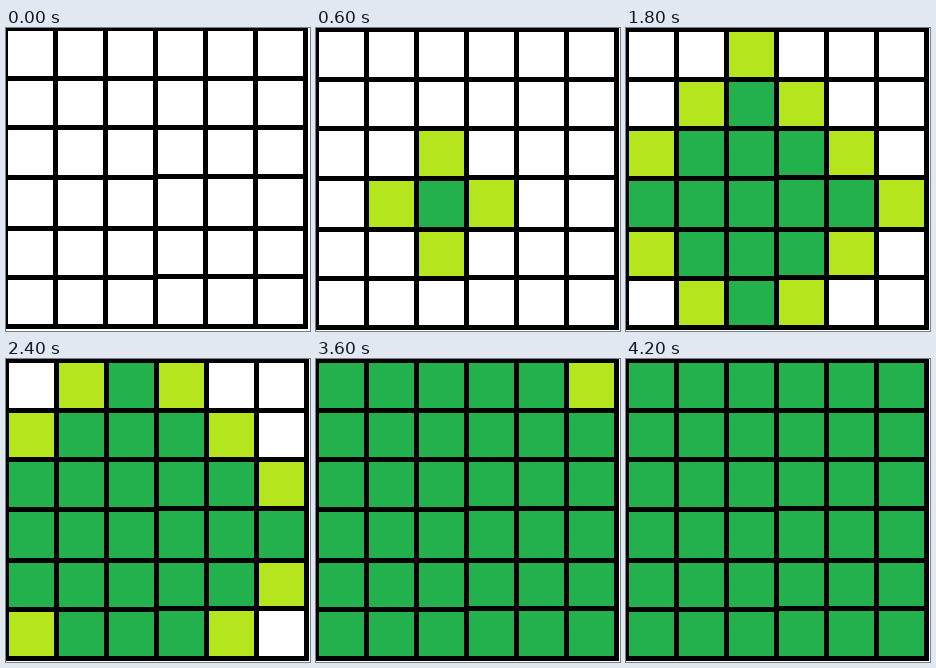
An HTML page for the animation above (4.8 s loop, 304 by 303 pixels).

```html
<!DOCTYPE html>
<html lang="en">
<head>
<meta charset="utf-8">
<title>Grid fill</title>
<style>
  html, body { margin: 0; width: 100%; height: 100%; overflow: hidden; background: #fff; }
  svg { display: block; }
  rect, g { animation: 4800ms step-end infinite; }
  #board { animation-name: nudge; }
  @keyframes nudge { 0% { transform: translate(-1px, -1px); } 12.5%, 100% { transform: none; } }
</style>
</head>
<body>
<svg width="304" height="303" viewBox="0 0 304 303" shape-rendering="crispEdges">
  <g id="board"><rect width="303" height="302"/></g>
</svg>
<script>
  const STEP = 12.5; // percent of the loop
  const START = { col: 2, row: 3 };
  const WHITE = '#fff', LIME = '#b5e61d', GREEN = '#22b14c';

  // Row spans differ slightly between the two halves of the board
  const LEFT = [[4, 49], [54, 98], [103, 148], [153, 199], [204, 248], [253, 297]];
  const RIGHT = [[4, 49], [54, 98], [103, 147], [152, 199], [204, 247], [252, 297]];

  // Each cell turns lime when the front reaches it, green one step later
  const spread = d => {
    const lime = d ? `${d * STEP}% { fill: ${LIME}; }` : '';
    return `@keyframes spread${d} { 0% { fill: ${WHITE}; } ${lime}
      ${(d + 1) * STEP}%, 100% { fill: ${GREEN}; } }`;
  };

  const style = document.createElement('style');
  style.textContent = Array.from({ length: 7 }, (_, d) => spread(d)).join('\n');
  document.head.append(style);

  const board = document.getElementById('board');
  for (let col = 0; col < 6; col++) {
    (col < 3 ? LEFT : RIGHT).forEach(([top, bottom], row) => {
      const cell = document.createElementNS('http://www.w3.org/2000/svg', 'rect');
      const box = { x: 3 + col * 50, y: top, width: 45, height: bottom - top };
      for (const key in box) cell.setAttribute(key, box[key]);
      const distance = Math.abs(col - START.col) + Math.abs(row - START.row);
      cell.style.animationName = 'spread' + distance;
      board.append(cell);
    });
  }
</script>
</body>
</html>
```
